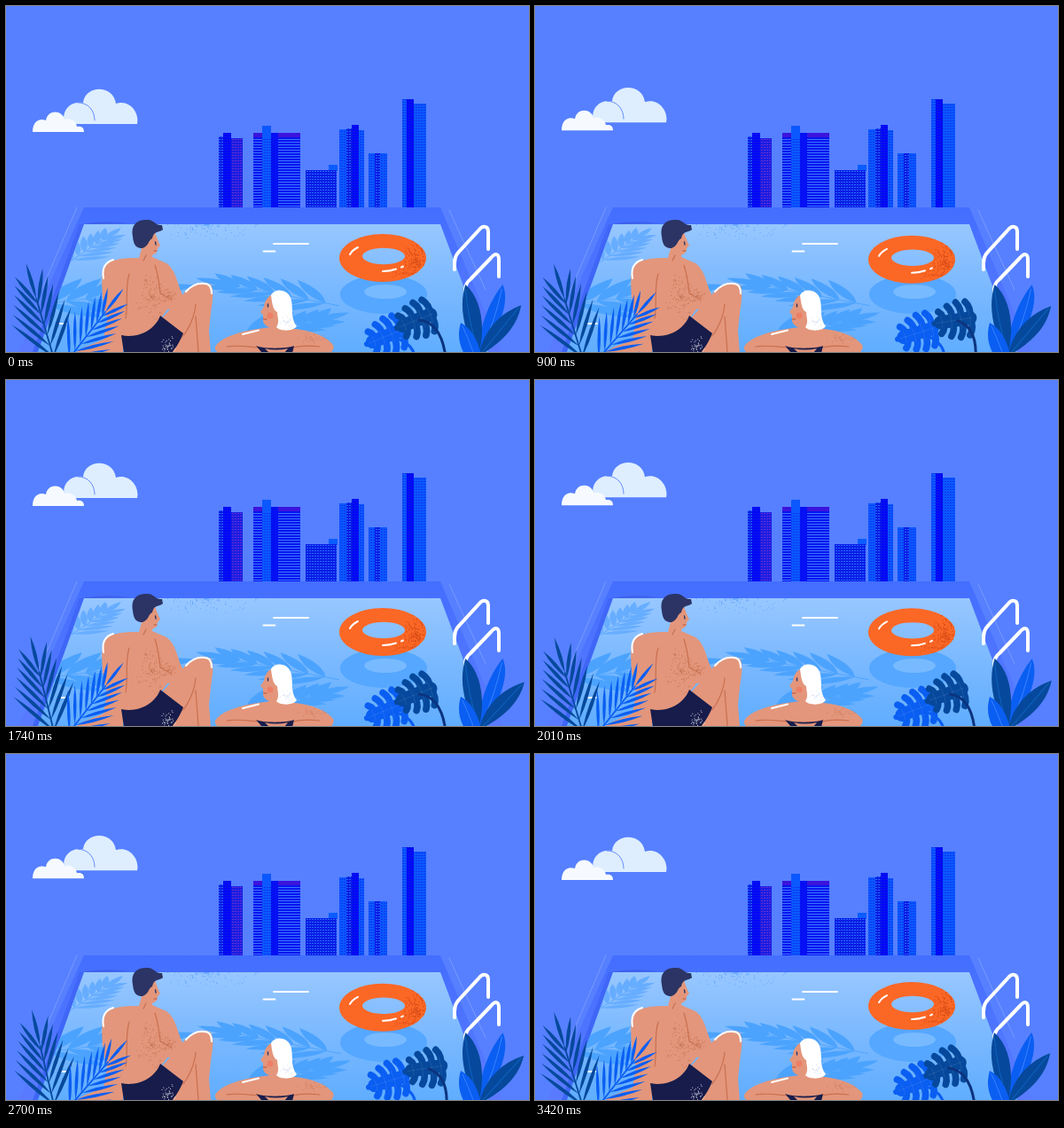
These frames come from a looping animation (590 px wide and 390 px high, 3.51 s). An HTML page:

```html
<!DOCTYPE html>
<html lang="en">
<head>
<meta charset="utf-8">
<title>Rooftop pool</title>
<style>
html, body { margin: 0; width: 100%; height: 100%; overflow: hidden; background: #5680ff; }
svg { display: block; width: 590px; height: 390px; }
.line { fill: none; stroke-linecap: round; stroke-linejoin: round; }
</style>
</head>
<body>
<svg id="stage" viewBox="0 0 590 390" xmlns="http://www.w3.org/2000/svg"></svg>
<script>
const LOOP = 3510, STEP = 30;
const DARK = '#06499c', BLUE = '#0a5ef2', NAVY = '#2b3464', TRUNKS = '#171c4b';
const SKIN = '#e3967b', CREASE = '#c96f50', SHADE = '#4ba3fe';

let seed = 7;
const rnd = () => (seed = (seed * 16807) % 2147483647) / 2147483647;
const f = n => n.toFixed(1);

const fill = (d, color) => `<path d="${d}" fill="${color}"/>`;
const line = (d, color, w) => `<path class="line" d="${d}" stroke="${color}" stroke-width="${w}"/>`;
const rect = (x, y, w, h, color) => `<rect x="${x}" y="${y}" width="${w}" height="${h}" fill="${color}"/>`;
const oval = (x, y, rx, ry, color) => `<ellipse cx="${x}" cy="${y}" rx="${rx}" ry="${ry}" fill="${color}"/>`;
const group = (id, body) => `<g id="${id}">${body}</g>`;

// Random dots, denser towards the centre
function grain(x, y, rx, ry, n, color, r = .5) {
  let d = '';
  while (n--) {
    const a = rnd() * 6.283, q = rnd();
    d += `M${f(x + Math.cos(a) * q * rx)} ${f(y + Math.sin(a) * q * ry)}h.1`;
  }
  return line(d, color, r * 2);
}

function blade(x, y, deg, len, w) {
  const a = deg * Math.PI / 180, sx = Math.sin(a), cy = -Math.cos(a);
  const mx = x + sx * len * .45, my = y + cy * len * .45;
  return `M${f(x)} ${f(y)}Q${f(mx - cy * w)} ${f(my + sx * w)} ${f(x + sx * len)} ${f(y + cy * len)}` +
    `Q${f(mx + cy * w)} ${f(my - sx * w)} ${f(x)} ${f(y)}Z`;
}

// Stem with pairs of blades that get shorter and steeper towards the tip
function frond(x0, y0, x1, y1, n, len, w, spread, color) {
  const dir = Math.atan2(x1 - x0, y0 - y1) * 180 / Math.PI;
  let d = blade(x1, y1, dir, len * .67, w);
  for (let i = 0; i < n; i++) {
    const u = .12 + .8 * i / (n - 1), x = x0 + (x1 - x0) * u, y = y0 + (y1 - y0) * u;
    for (const s of [-1, 1]) d += blade(x, y, dir + s * spread * (1 - .4 * u), len * (1 - .38 * u), w);
  }
  return fill(d, color) + line(`M${x0} ${y0}L${x1} ${y1}`, color, 1.8);
}

// Split leaf: separate rounded lobes on both sides of a midrib
function monstera(x, y, deg, color) {
  let lobes = '', body = 'M0 -14V20', veins = 'M0 -16V24';
  for (let i = 0; i < 4; i++) for (const s of [-1, 1]) {
    const reach = s * (14 + 6 * Math.sin(1 + i * .8)), top = -14 + i * 10.5;
    lobes += `M0 ${top}q${reach * .6} -3 ${reach} 3`;
    veins += `M0 ${top}l${reach * .5} 1`;
  }
  return `<g transform="translate(${x} ${y}) rotate(${deg})">` +
    line(lobes, color, 7.6) + line(body, color, 15) + line('M0 20V27', color, 6) + line(veins, '#ffffff1c', .7) + '</g>';
}

const tones = {
  deep: ['#0a1ce6', '#2469ff'], vivid: ['#0505fb', '#0420dc'], bright: ['#0b58ff', '#0a34f2'],
  plum: ['#1a1ce2', '#6430d4'], floors: ['#0714f0', '#3a74ff']
};
const patterns = Object.entries(tones).map(([id, [base, mark]]) =>
  `<pattern id="${id}" width="3" height="3" patternUnits="userSpaceOnUse">${rect(0, 0, 3, 3, base)}${rect(0, 0, id === 'floors' ? 3 : 2, 1, mark)}</pattern>`).join('');

// Columns standing side by side, each given as width, top and tone
const building = (x, ...cols) => cols.map(([w, top, tone]) => {
  x += w;
  return rect(x - w, top, w, 228 - top, `url(#${tone})`);
}).join('');

const skyline =
  building(240, [5, 147, 'deep'], [9, 143, 'vivid'], [13, 149, 'plum']) +
  building(279, [10, 143, 'floors'], [10, 135, 'bright'], [33, 143, 'floors']) +
  rect(279, 143, 53, 5, '#3c14dc') + rect(289, 135, 10, 13, '#0b58ff') + rect(299, 143, 8, 85, '#0610f4') +
  rect(364, 179, 10, 7, '#0b5cff') + building(338, [35, 185, 'deep']) +
  building(376, [8, 139, 'bright'], [6, 138, 'deep'], [8, 134, 'vivid'], [6, 140, 'bright']) +
  building(409, [7, 166, 'bright'], [6, 166, 'deep'], [8, 166, 'bright']) +
  building(447, [5, 105, 'bright'], [8, 105, 'vivid'], [14, 110, 'bright']);

const water = 'M88 246H490L544 390H36Z';

const defs = `<defs>${patterns}
<linearGradient id="pool" x2="0" y2="1"><stop stop-color="#98c7ff"/><stop offset=".45" stop-color="#7dbaff"/><stop offset="1" stop-color="#60adff"/></linearGradient>
<linearGradient id="deck" x2="0" y2="1"><stop stop-color="#436eff"/><stop offset="1" stop-color="#5a7bff"/></linearGradient>
<clipPath id="inPool"><path d="${water}"/></clipPath>
<clipPath id="inRing"><ellipse cx="425" cy="284" rx="49" ry="27"/></clipPath>
</defs>`;

const clouds = group('cloud',
  fill('M66 133C62 118 72 107 87 109C89 89 121 88 124 110C139 105 151 120 148 133Z', '#deeeff') +
  line('M81 109C93 109 100 118 100 129', '#5680ff', .9) +
  fill('M30 142C30 131 37 126 45 129C47 116 64 117 66 128C73 126 79 130 80 136C85 135 88 137 88 142Z', '#f6faff'));

const pool =
  fill('M88 227H490L560 390H14Z', 'url(#deck)') +
  line('M80 227L38 325M500 230L541 320', '#7f9cff', .9) +
  fill('M88 246L36 390H30L83 246Z', '#3f66f6') +
  fill(water, 'url(#pool)') +
  `<g clip-path="url(#inPool)">` +
  group('shadow',
    `<g transform="translate(0 160) scale(1 .48)">` +
    frond(30, 370, 165, 335, 6, 75, 17, 44, SHADE) +
    frond(375, 370, 255, 322, 6, 66, 13, 40, SHADE) +
    frond(260, 450, 350, 405, 6, 62, 13, 42, SHADE) +
    frond(70, 270, 112, 212, 6, 45, 8, 46, '#67adff') + '</g>') +
  grain(225, 247, 62, 17, 190, '#5ba0fb') +
  oval(426, 325, 49, 22, '#55a7ff') + oval(428, 322, 24, 8, '#78baff') + '</g>' +
  fill('M87 246Q108 241 142 245Z', '#3d60ea') +
  line('M302 268H341M290.5 276.5H303.5M59 358H70', '#fff', 1.8);

const ring = group('ring',
  `<path fill="#fb6725" fill-rule="evenodd" d="M376 284a49 27 0 1 0 98 0a49 27 0 1 0 -98 0M402 282a24 9.200 0 1 0 48 0a24 9.200 0 1 0 -48 0"/>` +
  `<g clip-path="url(#inRing)">${grain(463, 288, 15, 24, 150, '#d84d17', .7)}${grain(448, 301, 20, 6, 50, '#d84d17')}</g>` +
  line('M388 280C390 276 393 274 397 272M425 299C431 299 436 298 440 296.5M446 294.5L448 293.5', '#fff', 2));

const ladder = line('M506 297V290C506 284 507 281 511 277L534 252C538 247 544 248 544 254V274' +
  'M518 326V320C518 314 520 311 524 308L547 284C552 278 556 279 556 286V305', '#fff', 4);

const man =
  fill('M109 298C107 317 109 338 114 352L110 376L88 385L78 391H132V345Z', SKIN) +
  fill('M176 352L199 326C207 315 217 309 229 313C236 316 233 332 231 346L229 366L231 391H184Z', SKIN) +
  line('M203 322C210 314 217 311 227 313.5C231 315 232 319 232 324', '#fff', 2) +
  line('M214 336C213 350 206 364 200 372M214 350L217 390', CREASE, 1.2) +
  fill('M154 270L150 284C135 284 112 284 109 299C107 321 121 341 128 357L130 373C150 376 169 366 176 350L182 342C190 341 199 335 201 328C194 319 193 298 181 290L165 283L166 274Z', SKIN) +
  line('M110 307C108 296 111 289 121 286', '#fff', 2) +
  line('M139 302C134 317 138 335 135 352M168 292C172 304 173 314 174 324L187 331M155 287L158 281', CREASE, 1.2) +
  grain(164, 328, 17, 27, 130, '#c77455') + grain(183, 327, 9, 9, 45, '#c77455') +
  fill('M155 257L167 252C169 258 171 264 174 270L171 273C171 280 165 282 159 279L153 276Z', SKIN) +
  fill('M143 260C140 245 150 240 160 241C167 241 169 248 176 247L177 252C172 256 167 253 165 262C160 264 162 270 154 273C148 273 144 271 143 260Z', NAVY) +
  line('M168.5 266L169 269', NAVY, 1.4) + line('M167 276L170 276', '#b9573f', 1) +
  fill('M130 371C150 375 168 365 174 349L200 369C196 379 191 386 187 391H133Z', TRUNKS) +
  grain(184, 383, 9, 11, 38, '#fff', .45);

const woman =
  fill('M236 384C241 374 263 367 284 364L305 361L326 364C347 366 363 374 369 382Q371 387 366 391H240Q235 389 236 384Z', SKIN) +
  line('M267 370L285 365.5', '#fff', 2) +
  line('M249 384C262 382 273 384 283 385M325 385C335 382 345 383 354 384', CREASE, 1.2) +
  fill('M282 383C288 386 314 387 325 383L323 391H289Z', TRUNKS) + fill('M292 386Q304 389 318 386L314 391H297Z', SKIN) +
  fill('M301 325C294 328 292 333 291 339L287 345L290 348L290 355C291 361 298 363 305 363L314 348Z', SKIN) +
  fill('M299 326C303 318 319 318 322 332C324 344 321 352 328 361C324 367 309 367 305 362C309 356 306 351 306 345C301 343 300 334 299 326Z', '#fff') +
  oval(298, 349, 3.5, 3.5, '#ec7f66') + line('M295.5 336V339', NAVY, 1.4) + line('M290.5 353L294 353', '#b94f3d', 1) +
  grain(317, 357, 8, 8, 25, '#d4def5') + grain(344, 375, 17, 6, 35, '#c77455', .4);

const leftPlants =
  group('palm', frond(56, 404, 34, 330, 6, 62, 4.2, 38, DARK)) +
  group('fern', frond(66, 404, 112, 345, 7, 50, 3.6, 42, BLUE));

const leaf = (d, color, rib, tint) => fill(d, color) + line(rib, tint, 1);
const rightPlants =
  group('split', monstera(432, 371, 68, BLUE) + line('M438 374C452 378 459 385 461 394', BLUE, 3)) +
  group('dusk', monstera(466, 353, 68, DARK) + line('M466 354C484 356 493 372 496 396', '#0b347f', 3)) +
  group('tall',
    leaf('M560 314C569 332 556 369 533 393C533 364 544 334 560 314Z', BLUE, 'M559 319Q551 358 535 390', '#3880ff') +
    leaf('M518 314C537 330 541 365 533 393C517 370 510 339 518 314Z', DARK, 'M518 319Q522 358 533 390', '#0d62c0')) +
  group('side', leaf('M582 338C577 363 560 379 533 395C539 366 557 347 582 338Z', DARK, 'M579 341Q562 361 537 391', '#0d62c0')) +
  leaf('M513 357C525 363 533 378 536 394H518C511 382 509 371 513 357Z', BLUE, 'M515 361Q522 376 527 390', '#3880ff');

stage.innerHTML = defs + clouds + skyline + pool + ring + ladder + man + woman + leftPlants + rightPlants;

// Swings between two values, reaching the second one at `peak` of each cycle
const swing = (from, to, cycles, peak = .5) => t =>
  from + (to - from) * (1 + Math.cos(2 * Math.PI * (cycles * t / LOOP - peak))) / 2;
const turn = (x, y, angle) => t => `rotate(${angle(t).toFixed(3)} ${x} ${y})`;
const shift = (dx, dy, amount) => t => `translate(${dx * amount(t)} ${dy * amount(t)})`;

const moves = {
  cloud: shift(0, -1, swing(0, 2, 2, .42)),
  ring: shift(0, 1, swing(0, 1.8, 2)),
  shadow: shift(1, 0, swing(0, 2, 2)),
  palm: turn(56, 404, swing(-.8, 3.5, 3, .34)),
  fern: turn(66, 404, swing(0, 3, 2)),
  split: turn(472, 402, swing(0, 5, 2)),
  dusk: turn(468, 402, swing(0, 13, 2)),
  tall: turn(534, 394, swing(0, .6, 2, .3)),
  side: turn(534, 394, swing(-1, 3, 3, .45))
};
const parts = Object.entries(moves).map(([id, place]) => [document.getElementById(id), place]);
const start = performance.now();

function draw() {
  const t = Math.floor(((performance.now() - start) % LOOP) / STEP) * STEP;
  for (const [el, place] of parts) el.setAttribute('transform', place(t));
  requestAnimationFrame(draw);
}
draw();
</script>
</body>
</html>
```
